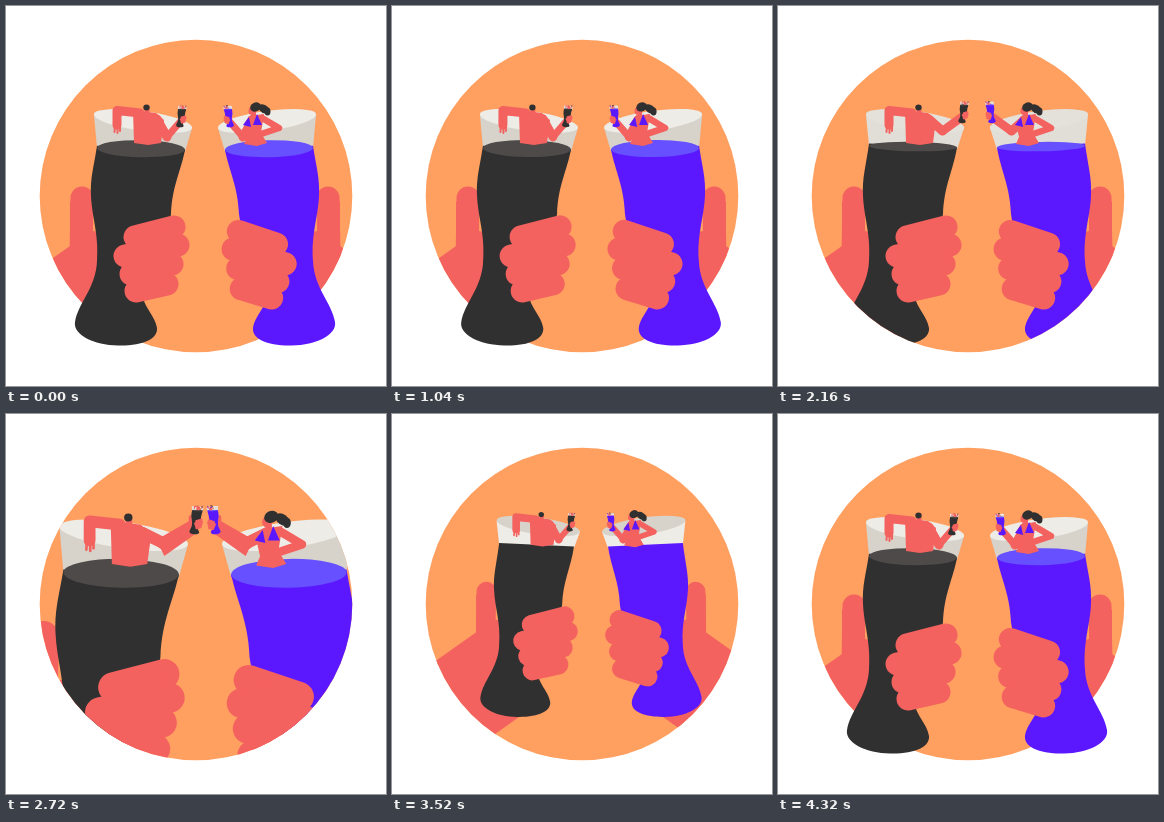
These frames come from a looping animation (380x380 px, 4360 ms). An HTML page with a canvas:

```html
<!DOCTYPE html>
<html lang="en">
<head>
<meta charset="utf-8">
<title>Cheers</title>
<style>
html, body { margin: 0; width: 100%; height: 100%; overflow: hidden; background: #fff; }
canvas { display: block; width: 380px; height: 380px; }
</style>
</head>
<body>
<canvas id="stage"></canvas>
<script>
const LOOP = 4360;
const NEST = 0.0914;          // size of a held glass relative to the glass its owner sits in
const FOCUS = { x: 199, y: 95 };
const SKIN = '#f4625f', ORANGE = '#ff9f60', LIGHT = [238, 236, 231], GREY = [215, 211, 202];
const SIDES = [
  { mirror: false, fill: '#303030', top: '#4d4a49', handDrop: 0 },
  { mirror: true, fill: '#5b18ff', top: '#6750ff', handDrop: 6 }
];

const canvas = document.getElementById('stage');
const ctx = canvas.getContext('2d');
const dpr = window.devicePixelRatio || 1;
canvas.width = canvas.height = 380 * dpr;

// Monotone cubic track through [time, value] points
function track(points) {
  const n = points.length;
  const slope = [];
  for (let i = 0; i < n - 1; i++) {
    slope.push((points[i + 1][1] - points[i][1]) / (points[i + 1][0] - points[i][0]));
  }
  const tangent = points.map((_, i) => {
    const a = slope[i - 1], b = slope[i];
    return a * b > 0 ? 2 * a * b / (a + b) : 0;
  });
  return t => {
    if (t <= points[0][0]) return points[0][1];
    if (t >= points[n - 1][0]) return points[n - 1][1];
    let i = 0;
    while (t > points[i + 1][0]) i++;
    const [t0, v0] = points[i], [t1, v1] = points[i + 1];
    const h = t1 - t0, u = (t - t0) / h, w = 1 - u;
    return v0 * (1 + 2 * u) * w * w + v1 * u * u * (3 - 2 * u)
      + h * u * w * (w * tangent[i] - u * tangent[i + 1]);
  };
}

const logZoom = track([[2200, 0], [2720, 0.27], [3120, 1.758], [3520, 2.23], [4000, 2.375], [4340, 2.3925]]);
const swing = track([[0, 0], [420, 20.5], [600, 10], [1000, 0], [1520, -0.6], [2000, 0]]);
const reach = track([[1720, 0], [2500, 1]]);
const sag = track([[2720, 0], [3120, 1]]);
const outerTilt = track([[1080, 8.5], [1480, 0], [1800, 0], [2600, 11]]);
const innerTilt = track([[2800, 5], [3120, 5], [3500, 0], [3640, 0], [4320, 8.5]]);

const mix = (a, b, u) => a + (b - a) * u;
const mixColor = (a, b, u) => `rgb(${a.map((v, i) => Math.round(mix(v, b[i], u)))})`;

function fill(color, build) {
  ctx.fillStyle = color;
  ctx.beginPath();
  build();
  ctx.fill();
}

function poly(color, ...pts) {
  fill(color, () => pts.forEach(p => ctx.lineTo(p[0], p[1])));
}

function oval(color, x, y, rx, ry, deg = 0) {
  fill(color, () => ctx.ellipse(x, y, rx, ry, deg * Math.PI / 180, 0, 7));
}

function limb(width, ...pts) {
  ctx.strokeStyle = SKIN;
  ctx.lineWidth = width;
  ctx.lineCap = ctx.lineJoin = 'round';
  ctx.beginPath();
  pts.forEach(p => ctx.lineTo(p[0], p[1]));
  ctx.stroke();
}

function drawArm() {
  limb(23, [76, 192], [75, 250]);
  poly(SKIN, [64, 195], [64, 240], [-190, 419], [-140, 520], [121, 335], [110, 230], [87, 225]);
}

function drawGlass(side, tilt) {
  const open = Math.min(1, tilt / 8.5);
  const level = 138 + tilt * 0.55;
  poly(mixColor(LIGHT, GREY, open), [88, 109], [91, level - 1], [179, level + 3], [186, 122]);
  oval(mixColor(GREY, LIGHT, open), 137, 115, 49.5, 10, 8);
  fill(side.fill, () => {
    ctx.moveTo(91, level - 3);
    ctx.bezierCurveTo(88, 160, 84, 172, 85, 190);
    ctx.bezierCurveTo(86, 212, 93, 228, 91, 255);
    ctx.bezierCurveTo(90, 282, 72, 297, 69, 316);
    ctx.bezierCurveTo(67, 329, 88, 339, 112, 339.5);
    ctx.bezierCurveTo(137, 340, 152, 333, 151, 322);
    ctx.bezierCurveTo(149, 308, 135, 300, 136, 282);
    ctx.bezierCurveTo(139, 258, 162, 235, 165, 208);
    ctx.bezierCurveTo(166, 180, 175, 165, 179, level + 1);
  });
  if (tilt > 0.2) {
    oval(side.fill, 135, level + 1, 44, tilt, 1);
    oval(side.top, 135, level, 44, tilt, 1);
  }
}

function drawHand(drop) {
  ctx.save();
  ctx.translate(145, 253 + drop);
  ctx.rotate(-drop * 0.012);
  ctx.translate(-145, -253);
  limb(23, [129, 231], [168, 221]);
  limb(23, [119, 250], [172, 239]);
  limb(23, [125, 268], [166, 258]);
  limb(23, [130, 285], [161, 278]);
  poly(SKIN, [129, 231], [168, 221], [172, 239], [166, 258], [161, 278], [130, 285], [119, 250]);
  ctx.restore();
}

function drawMan() {
  poly(SKIN, [127, 104], [150, 107], [158, 114], [155, 137], [142, 139], [128, 137]);
  limb(9, [134, 107], [111, 104.5], [111, 119]);
  limb(2, [109, 118], [108.5, 126]);
  limb(2, [111.5, 118], [111.5, 127]);
  limb(2, [114, 118], [114, 125]);
  limb(5, [141, 104], [141, 109]);
  oval('#303030', 140.5, 101.5, 3.2, 3);
}

function drawWoman(side) {
  poly(SKIN, [140, 108], [155, 110], [160, 118], [157, 131], [160, 138], [147, 140], [137, 137], [143, 127]);
  limb(6.5, [142, 112], [125, 122], [143, 128]);
  limb(4, [150, 105], [150, 111]);
  oval(SKIN, 152, 105, 3.5, 4);
  oval('#303030', 148.5, 101, 5.5, 4.5, 25);
  oval('#303030', 140, 103, 6, 4, -35);
  oval('#303030', 136.5, 105.5, 3, 4);
  poly(side.fill, [155, 111], [161, 119], [153, 121]);
  poly(side.fill, [147, 108], [151, 119], [142, 119]);
}

function drawPerson(side, state) {
  const e = state.reach;
  const elbow = [mix(161, 167, e), mix(131, 121, e)];
  const hand = [mix(174, 190, e), mix(116, 108, e)];
  limb(9, [151, 113], elbow);
  limb(mix(7, 9.5, e), elbow, hand);
  side.mirror ? drawWoman(side) : drawMan();
}

function drawBody(side, states, depth) {
  const state = states[Math.min(depth, states.length - 1)];
  ctx.save();
  ctx.translate(state.sag, state.sag * 6);
  drawGlass(side, state.tilt);
  ctx.restore();
  drawPerson(side, state);
  if (depth < 2) {
    const rest = 1 - state.reach;
    ctx.save();
    ctx.translate(FOCUS.x - 17 * rest, FOCUS.y + 7 * rest - 3 * (1 - state.sag));
    ctx.scale(NEST, NEST);
    ctx.translate(-FOCUS.x, -FOCUS.y);
    if (state.reach > 0.6) drawArm();
    drawBody(side, states, depth + 1);
    ctx.restore();
  }
  drawHand(side.handDrop);
}

function eachSide(zoom, angle, draw) {
  for (const side of SIDES) {
    ctx.save();
    if (side.mirror) {
      ctx.translate(398, 0);
      ctx.scale(-1, 1);
    }
    ctx.translate(FOCUS.x, FOCUS.y);
    ctx.scale(zoom, zoom);
    ctx.translate(-FOCUS.x, -FOCUS.y);
    ctx.translate(83, 165);
    ctx.rotate(angle * Math.PI / 180);
    ctx.translate(-83, -165);
    draw(side);
    ctx.restore();
  }
}

function clipDisc() {
  ctx.beginPath();
  ctx.arc(190, 190, 156.3, 0, 7);
  ctx.clip();
}

function render(t) {
  ctx.setTransform(dpr, 0, 0, dpr, 0, 0);
  ctx.fillStyle = '#fff';
  ctx.fillRect(0, 0, 380, 380);
  oval(ORANGE, 190, 190, 156.3, 156.3);

  let zoom = Math.exp(logZoom(t));
  const inner = { tilt: innerTilt(t), reach: 0, sag: 0 };
  const outer = { tilt: outerTilt(t), reach: reach(t), sag: sag(t) };
  const arrived = zoom > 7.8;   // the held glasses now fill the scene
  if (arrived) zoom *= NEST;
  const states = arrived ? [inner] : [outer, inner];
  const angle = swing(t);

  ctx.save();
  clipDisc();
  eachSide(zoom, angle, drawArm);
  ctx.restore();

  ctx.save();
  if (t >= 1160 && !arrived) clipDisc();
  eachSide(zoom, angle, side => drawBody(side, states, 0));
  ctx.restore();
}

function loop() {
  render(performance.now() % LOOP);
  requestAnimationFrame(loop);
}
loop();
</script>
</body>
</html>
```
